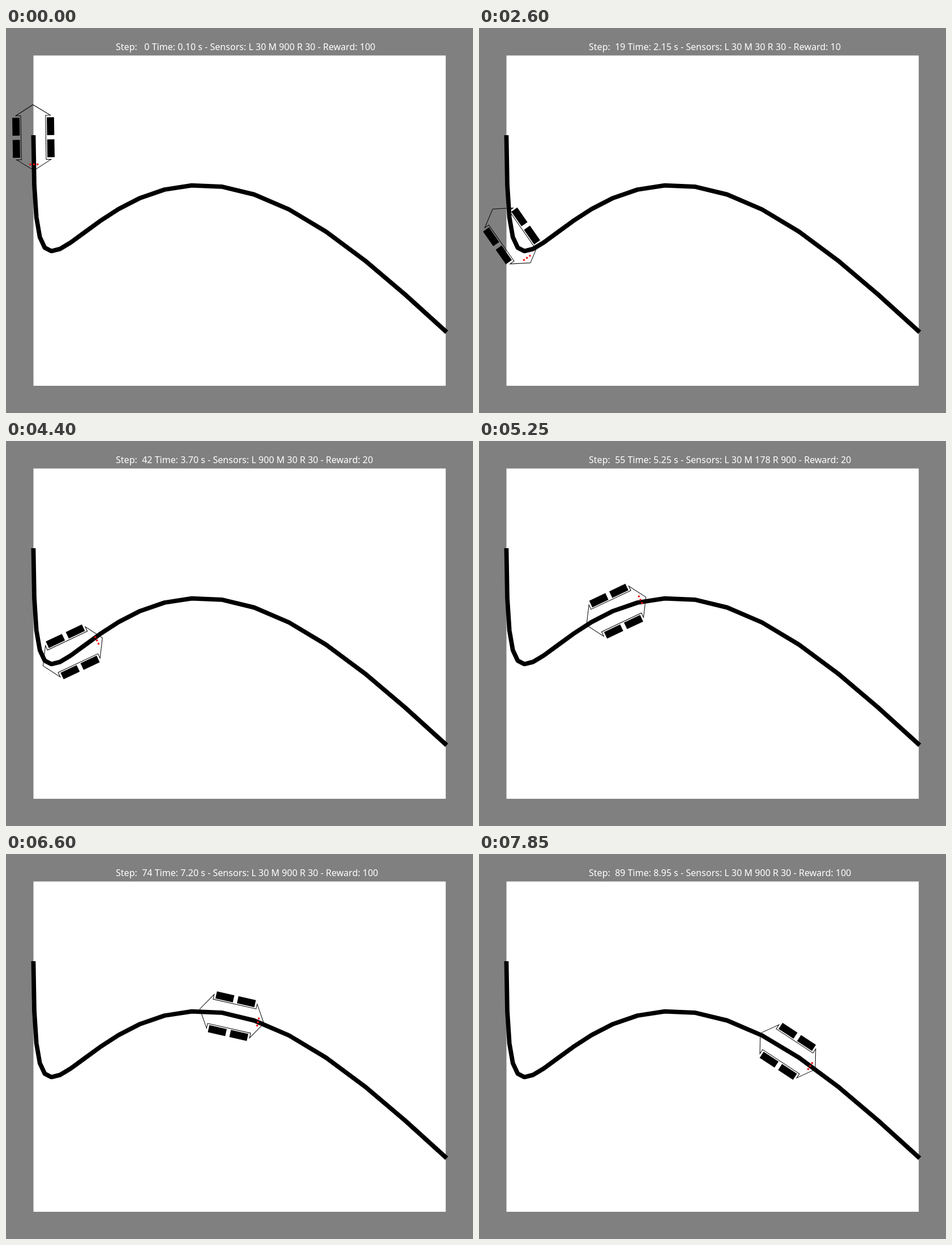
Recreate the animation shown at these times as an HTML page with a canvas. Size 825 px wide and 679 px high, loop 8 s.

```html
<!DOCTYPE html>
<html lang="en">
<head>
<meta charset="utf-8">
<title>Line follower</title>
<style>
html, body { margin: 0; width: 100%; height: 100%; overflow: hidden; background: #808080; }
canvas { display: block; }
</style>
</head>
<body>
<canvas id="stage" width="825" height="679"></canvas>
<script>
const ctx = document.getElementById('stage').getContext('2d');
const LOOP = 8000, STRIDE = 15.9, RAD = Math.PI / 180;
const NOSE = 58, SIDE = 38.9, OUTER = 30.6, INNER = 21.9, EYE = 47.3, EYE_GAP = 6.4;

// The road is one polynomial curve through these points, cut into straight pieces.
const roadKeys = [
  [48.4, 189], [50, 277], [68.5, 387.5], [138, 361],
  [280, 285], [500, 320], [705, 470], [778.5, 536.5]
];
const PIECES = 20;

// Where the robot is at a few steps: step, start in ms, x, y, heading in degrees.
const stops = [
  [0, 0, 48.5, 193.2, 89.1],
  [9, 1250, 51, 336.5, 89.1],
  [13, 1850, 55.5, 368, 80.5],
  [22, 2900, 69.5, 377.5, 46.5],
  [28, 3500, 71.6, 376.5, 20.5],
  [42, 4400, 117.9, 371.9, -25.3],
  [49, 4850, 185.9, 330.8, -33.7],
  [55, 5250, 242.4, 300.1, -25.3],
  [74, 6600, 399, 286, 12.7],
  [86, 7400, 518.3, 331.5, 29.2],
  [89, 7850, 545.5, 348, 33.3]
];

const clamp = v => Math.max(0, Math.min(1, v));

// Lagrange interpolation on Chebyshev nodes, which keeps the curve from overshooting.
function roadPoint(t) {
  const last = roadKeys.length - 1;
  const nodes = roadKeys.map((_, k) => Math.round(PIECES / 2 * (1 - Math.cos(Math.PI * k / last))));
  let x = 0, y = 0;
  roadKeys.forEach(([kx, ky], k) => {
    let w = 1;
    nodes.forEach((n, j) => { if (j !== k) w *= (t - n) / (nodes[k] - n); });
    x += kx * w;
    y += ky * w;
  });
  return [x, y];
}

const road = Array.from({ length: PIECES + 1 }, (_, i) => roadPoint(i));

function roadDistance(x, y) {
  let best = Infinity;
  for (let i = 1; i < road.length; i++) {
    const [ax, ay] = road[i - 1], dx = road[i][0] - ax, dy = road[i][1] - ay;
    const k = clamp(((x - ax) * dx + (y - ay) * dy) / (dx * dx + dy * dy));
    best = Math.min(best, Math.hypot(x - ax - k * dx, y - ay - k * dy));
  }
  return best;
}

function readSensors({ x, y, a }) {
  const c = Math.cos(a * RAD), s = Math.sin(a * RAD);
  return [-EYE_GAP, 0, EYE_GAP].map(v => {
    const d = roadDistance(x + EYE * c - v * s, y + EYE * s + v * c);
    return Math.round(30 + 870 * clamp((4.6 - d) / 2));
  });
}

// Each step either drives one stride or turns on the spot; both are spread evenly over a leg.
function simulate() {
  const [, , x0, y0, a0] = stops[0];
  const steps = [{ x: x0, y: y0, a: a0, start: 0, time: 0.1 }];
  for (let k = 1; k < stops.length; k++) {
    const [n0, t0, sx, sy, from] = stops[k - 1], [n1, t1, ex, ey, to] = stops[k];
    const count = n1 - n0;
    const drives = Math.round(Math.hypot(ex - sx, ey - sy) / STRIDE);
    const turn = (to - from) / Math.max(1, count - drives);
    let x = sx, y = sy, a = from, time = steps[n0].time;
    const leg = [];
    for (let i = 1; i <= count; i++) {
      const drive = Math.floor(i * drives / count) > Math.floor((i - 1) * drives / count);
      if (drive) {
        x += STRIDE * Math.cos(a * RAD);
        y += STRIDE * Math.sin(a * RAD);
      } else a += turn;
      time += drive ? 0.15 : 0.05;
      const start = Math.floor((t0 + (t1 - t0) * i / count) / 50) * 50;
      leg.push({ x, y, a, start, time });
    }
    // Spread the drift so that the leg ends on its stop.
    leg.forEach((p, i) => {
      p.x += (ex - x) * (i + 1) / count;
      p.y += (ey - y) * (i + 1) / count;
    });
    steps.push(...leg);
  }
  steps.forEach((p, i) => {
    const [l, m, r] = readSensors(p);
    const reward = m > 800 ? 100 : Math.max(l, m, r) > 100 ? 20 : 10;
    const label = String(i).padStart(3, '\u00a0');
    p.text = `Step: ${label} Time: ${p.time.toFixed(2)} s - Sensors: L ${l} M ${m} R ${r} - Reward: ${reward}`;
  });
  return steps;
}

const steps = simulate();

function trace(points) {
  ctx.beginPath();
  points.forEach(([x, y]) => ctx.lineTo(x, y));
}

function block(x, y, w, h) {
  ctx.fillRect(x - w / 2, y - h / 2, w, h);
}

function drawCar({ x, y, a }) {
  ctx.save();
  ctx.translate(x, y);
  ctx.rotate(a * RAD);
  ctx.lineWidth = 1;
  for (const s of [-1, 1]) {
    trace([[-NOSE, 0], [-SIDE, s * OUTER], [-SIDE, s * INNER],
           [SIDE, s * INNER], [SIDE, s * OUTER], [NOSE, 0]]);
    ctx.stroke();
    ctx.fillStyle = '#000';
    block(-19.5, s * 30.5, 31.5, 12.8);
    block(19.5, s * 30.5, 31.5, 12.8);
  }
  ctx.fillStyle = '#f00';
  for (const s of [-1, 0, 1]) block(EYE, s * EYE_GAP, 3, 3);
  ctx.restore();
}

function draw(t) {
  let i = steps.length - 1;
  while (i > 0 && steps[i].start > t) i--;

  ctx.fillStyle = '#808080';
  ctx.fillRect(0, 0, 825, 679);
  ctx.fillStyle = '#fff';
  ctx.fillRect(48.5, 48.5, 728.3, 582.5);

  ctx.font = '16.06px "Noto Sans", "Open Sans", sans-serif';
  ctx.fillText(steps[i].text, 194, 39);

  ctx.strokeStyle = '#000';
  ctx.lineJoin = 'bevel';
  ctx.lineWidth = 7.8;
  trace(road);
  ctx.stroke();
  ctx.lineJoin = 'miter';
  drawCar(steps[i]);
}

const origin = performance.now();
function tick() {
  draw((performance.now() - origin) % LOOP);
  requestAnimationFrame(tick);
}
tick();
</script>
</body>
</html>
```
